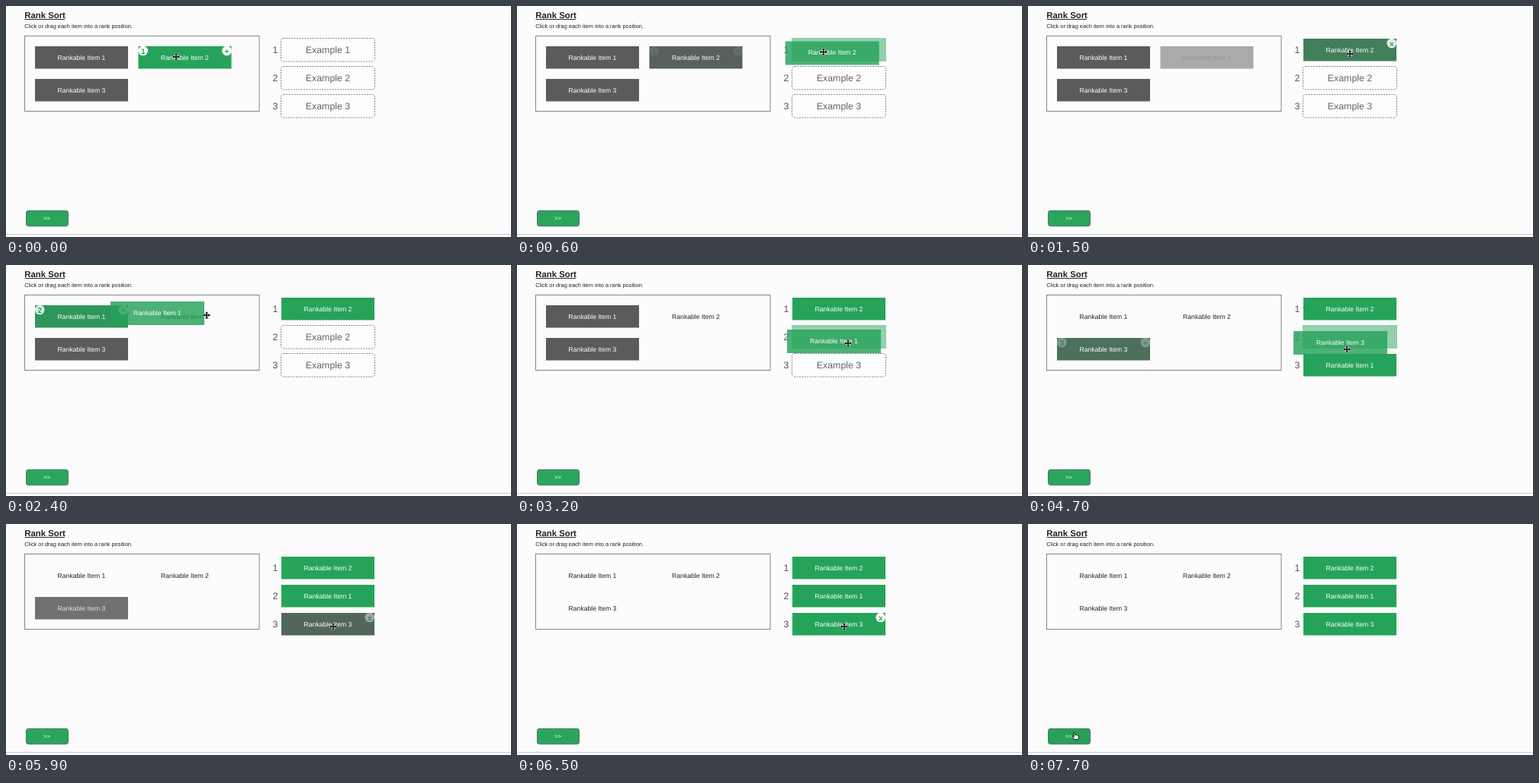
Recreate the animation shown at these times as an HTML page. Size 662 by 304 pixels, loop 7.8 s.

```html
<!DOCTYPE html>
<html lang="en">
<head>
<meta charset="utf-8">
<title>Rank Sort</title>
<style>
  html, body { margin: 0; width: 100%; height: 100%; overflow: hidden; background: #fcfcfd; }
  svg { display: block; width: 662px; height: 304px; }
  text { font-family: "Liberation Sans", Arial, sans-serif; text-rendering: geometricPrecision; }
  .label { font-size: 8.65px; text-anchor: middle; fill: #fff; }
  .hint { font-size: 12.35px; text-anchor: middle; fill: #666; }
  .rank { font-size: 12.35px; text-anchor: middle; fill: #555; }
  .dash { fill: #fdfdfe; stroke: #777; stroke-dasharray: 2 1.4; stroke-width: .9; }
  .badge circle { fill: #fff; }
  .badge text { font-size: 10px; font-weight: bold; text-anchor: middle; fill: #26a35a; }
  .button { stroke: #557262; }
</style>
</head>
<body>
<svg viewBox="0 0 662 304">
  <rect width="662" height="304" fill="#fcfcfd"/>
  <path d="M0 300.5H662" stroke="#c9c9cb"/>
  <text x="24.3" y="16" font-size="11.35" font-weight="bold" fill="#222">Rank Sort</text>
  <path d="M24.5 17.6H77" stroke="#222"/>
  <text x="24.3" y="28.8" font-size="7.4" fill="#222">Click or drag each item into a rank position.</text>
  <rect x="24.5" y="39.5" width="307.5" height="99" fill="none" stroke="#858585"/>
  <g id="items"></g>
  <g id="slots"></g>
  <rect id="button" class="button" x="26.5" y="269.3" width="55" height="20.4" rx="3"/>
  <text x="53.5" y="281.7" font-size="7.8" text-anchor="middle" fill="#fff">&gt;&gt;</text>
  <g id="ghost">
    <rect width="123" height="31" fill="#26a35a" opacity=".82"/>
    <text class="label" x="61.5" y="17.8"></text>
  </g>
  <g id="cursor">
    <g id="move">
      <path d="M-4 0H4M0-4V4" stroke="#fff" stroke-width="3"/>
      <path d="M0-4.8 2-2.6H-2ZM0 4.8 2 2.6H-2ZM-4.8 0-2.6-2V2ZM4.8 0 2.6-2V2Z" stroke="#fff" stroke-width=".8" paint-order="stroke"/>
      <path d="M-4 0H4M0-4V4" stroke="#000" stroke-width="1.3"/>
    </g>
    <path id="arrow" d="M0-.5V8.6L2-.0V6.8L2 6.8 3.6 10 5 9.3 3.5 6.2H6.2Z" fill="#000" stroke="#fff" stroke-width=".6" paint-order="stroke"/>
    <path id="hand" d="M-2.6-4.2Q-1.8-5.4-.9-4.3L-.3-1.2Q.6-2 1.3-1.1 2.4-1.7 2.9-.6 4.3-.9 4.4.6V2.6L3.4 4.7H-.8L-4 1.2Q-4.3-.1-2.8.2L-1.6 1.2Z" fill="#fff" stroke="#000" stroke-width=".9" stroke-linejoin="round"/>
  </g>
</svg>
<script>
const LOOP = 7800, STEP = 100;
const GREY = [91, 91, 91], GREEN = [38, 163, 90], WHITE = [255, 255, 255], INK = [34, 34, 34];
const $ = id => document.getElementById(id);

// x, y: place in the pool; over/out: hover; drop: release; fade: start of the colour change
const items = [
  { x: 38, y: 53, next: 2, over: 1900, out: 2330, drop: 3500, fade: 3550, leave: 3760,
    drag: [[2200, 38, 53], [2300, 50, 52], [2400, 137, 48], [2700, 357, 82], [2800, 354, 85]] },
  { x: 173.5, y: 53, next: 1, over: -600, out: 280, drop: 1300, fade: 1355, leave: 1650,
    drag: [[100, 173, 53], [700, 366, 46], [1000, 367, 47]] },
  { x: 38, y: 96, next: 3, over: 3960, out: 4490, drop: 5800, fade: 5835, leave: 6550,
    drag: [[4300, 38, 96], [4700, 348, 87], [5000, 382, 112], [5200, 389, 116],
           [5300, 379, 118], [5500, 375, 118], [5700, 360, 112]] }
];

const pointer = [
  [0, 223, 67], [100, 223, 67], [700, 416, 60], [1000, 417, 61], [1300, 417, 61], [1500, 422, 63],
  [1600, 422, 63], [1950, 130, 70], [2200, 120, 71], [2300, 150, 69], [2400, 263, 66],
  [2700, 437, 100], [2800, 434, 103], [3600, 434, 103], [3800, 217, 86], [4050, 112, 119],
  [4300, 108, 120], [4700, 418, 111], [5000, 452, 136], [5200, 459, 140], [5300, 449, 142],
  [5500, 445, 142], [5700, 430, 136], [5900, 429, 135], [6500, 429, 135], [7200, 62, 279]
];

const within = (t, a, b) => t >= a && t < b;
const clamp = v => Math.min(1, Math.max(0, v));
const mix = (a, b, p) => `rgb(${a.map((v, i) => Math.round(v + (b[i] - v) * p))})`;

// cubic-bezier(.25, .1, .25, 1)
function ease(x) {
  x = clamp(x);
  let lo = 0, hi = 1, u = .5;
  for (let i = 0; i < 14; i++) {
    u = (lo + hi) / 2;
    const bx = .75 * u * (1 - u) + u ** 3;
    if (bx < x) lo = u; else hi = u;
  }
  return x === 0 || x === 1 ? x : .3 * u * (1 - u) ** 2 + 3 * u * u * (1 - u) + u ** 3;
}

const pulse = (t, a, b, rise) => ease((t - a) / rise) * (1 - ease((t - b) / 500));

function along(track, t) {
  let i = track.findIndex(p => p[0] > t);
  if (i < 0) i = track.length;
  const a = track[Math.max(0, i - 1)], b = track[Math.min(i, track.length - 1)];
  const k = clamp((t - a[0]) / (b[0] - a[0] || 1)), s = k * k * (3 - 2 * k);
  return [a[1] + (b[1] - a[1]) * s, a[2] + (b[2] - a[2]) * s];
}

const badge = (x, char) =>
  `<g class="badge" transform="translate(${x} 6)"><circle r="6.3"/><text y="3.5">${char}</text></g>`;

items.forEach((item, i) => {
  $("items").innerHTML += `<g transform="translate(${item.x} ${item.y})">
    <rect width="122" height="29.5"/>
    <text class="label" x="61" y="17.5">Rankable Item ${i + 1}</text>
    <g class="marks">${badge(6.2, item.next)}${badge(116, "+")}</g></g>`;
  $("slots").innerHTML += `<g transform="translate(361 ${43 + 37 * i})">
    <text class="rank" x="-8" y="19.4">${i + 1}</text>
    <g class="empty"><rect class="dash" x="-.5" y="-.5" width="123" height="30.5" rx="3.5"/>
      <text class="hint" x="61" y="19.2">Example ${i + 1}</text></g>
    <rect class="target" x="-1" y="-1" width="124" height="31" fill="#93d0ab"/>
    <g class="full"><rect width="122" height="29.5"/>
      <text class="label" x="61" y="17.5"></text>${badge(115.7, "x")}</g></g>`;
});

const show = (el, on) => el.setAttribute("visibility", on ? "visible" : "hidden");
const place = (el, [x, y]) => el.setAttribute("transform", `translate(${x.toFixed(2)} ${y.toFixed(2)})`);
const shade = (el, color) => el.setAttribute("fill", color);

function drawItem(el, item, t) {
  const gone = ease((t - item.fade) / 500);
  const hover = t < item.drop ? pulse(t, item.over, item.out, 500) : 0;
  const [box, label, marks] = el.children;
  shade(box, mix(GREY, GREEN, hover));
  box.setAttribute("opacity", 1 - gone);
  label.style.fill = mix(WHITE, INK, gone);
  marks.setAttribute("opacity", hover);
}

// Which item sits in each slot, and which slot lies under the dragged one
function slotState(t) {
  const swapped = within(t, 4600, 4900);
  const held = [t >= 1300 ? 1 : -1, -1, -1];
  if (t >= 3500) held[swapped ? 2 : 1] = 0;
  if (t >= 5800) held[2] = 2;
  const target = within(t, 500, 1300) ? 0
    : within(t, 2600, 3500) || swapped ? 1
    : within(t, 4900, 5800) ? 2 : -1;
  return { held, target };
}

function drawSlot(el, id, isTarget, t) {
  const [, empty, target, full] = el.children;
  show(empty, id < 0 && !isTarget);
  show(target, isTarget);
  show(full, id >= 0);
  if (id < 0) return;
  const item = items[id], [box, label, mark] = full.children;
  shade(box, mix(GREY, GREEN, ease((t - item.fade) / 500)));
  label.textContent = `Rankable Item ${id + 1}`;
  mark.setAttribute("opacity", pulse(t, item.fade, item.leave, 250));
}

function draw(t) {
  items.forEach((item, i) => drawItem($("items").children[i], item, t));
  const { held, target } = slotState(t);
  held.forEach((id, i) => drawSlot($("slots").children[i], id, target === i, t));

  const id = items.findIndex(item => t > item.drag[0][0] && t < item.drop);
  show($("ghost"), id >= 0);
  if (id >= 0) {
    place($("ghost"), along(items[id].drag, t));
    $("ghost").lastElementChild.textContent = `Rankable Item ${id + 1}`;
  }

  const onButton = t >= 7100;
  const idle = within(t, 1700, 1900) || within(t, 3700, 4000) || within(t, 6700, 7100);
  place($("cursor"), along(pointer, t));
  show($("hand"), onButton);
  show($("arrow"), idle);
  show($("move"), !idle && !onButton);
  shade($("button"), onButton ? "#27a058" : "#2aa65c");
}

const start = performance.now();
function tick() {
  // the picture advances ten times a second
  const t = (performance.now() - start + 10) % LOOP;
  draw(Math.floor(t / STEP) * STEP);
  requestAnimationFrame(tick);
}
tick();
</script>
</body>
</html>
```
